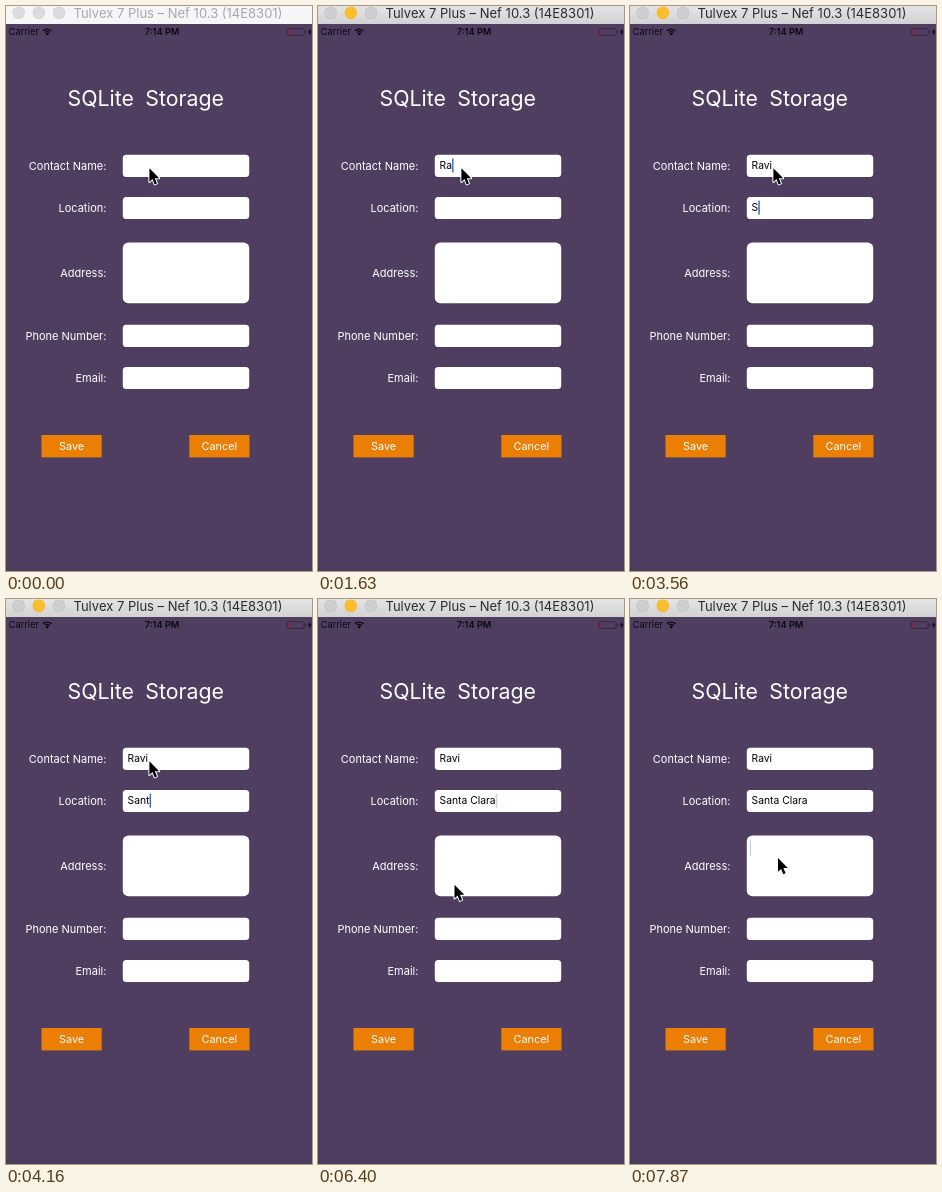
Recreate the animation shown at these times as an HTML page with a canvas. Size 306 by 565 pixels, loop 8000 ms.

```html
<!DOCTYPE html>
<html lang="en">
<head>
<meta charset="utf-8">
<title>SQLite Storage</title>
<style>
html, body { margin: 0; width: 100%; height: 100%; overflow: hidden; background: #503e61; }
canvas { display: block; width: 306px; height: 565px; }
</style>
</head>
<body>
<canvas id="stage"></canvas>
<script>
const W = 306, H = 565, LOOP = 8000, TICK = 148.4;
const canvas = document.getElementById('stage');
const ctx = canvas.getContext('2d');
const dpr = window.devicePixelRatio || 1;
canvas.width = W * dpr;
canvas.height = H * dpr;

const FAMILY = 'Inter, Roboto, sans-serif';
const PERSON = 'Ravi', PLACE = 'Santa Clara';
const PURPLE = '#503e61', ORANGE = '#ea7f03', INK = '#0b0810';

const FIELDS = [
  { label: 'Contact Name:', y: 148.8 },
  { label: 'Location:', y: 190.9 },
  { label: 'Address:', y: 236.6, h: 60.6, radius: 5.5 },
  { label: 'Phone Number:', y: 318.8 },
  { label: 'Email:', y: 360.9 }
].map(f => ({ h: 22.2, radius: 3.5, ...f }));

// Stretches of focus and typing, in ticks; the caret blinks once one is over.
const ACTIVITY = [
  { field: 0, from: 2, to: 13 },
  { field: 1, from: 16, to: 16 },
  { field: 1, from: 24, to: 36 },
  { field: 2, from: 46, to: 46 }
];

const START = { x: 143.4, y: 162.2 }, LOW = { x: 136.5, y: 285.7 }, REST = { x: 148, y: 259 };

const clamp = (v, lo, hi) => Math.min(hi, Math.max(lo, v));
const lerp = (a, b, p) => a + (b - a) * p;

function ease(tick, from, to) {
  const p = clamp((tick - from) / (to - from), 0, 1);
  return p * p * (3 - 2 * p);
}

function typed(str, tick, start, rate) {
  if (tick < start) return '';
  return str.slice(0, Math.floor(1.45 + (tick - start) * rate));
}

// Four ticks on, one faint, two off, one faint.
function blink(idle) {
  const phase = (idle + 8) % 8;
  return phase < 4 ? 1 : phase === 4 || phase === 7 ? 0.3 : 0;
}

function text(str, x, y, size, color, align = 'left', weight = 400) {
  ctx.font = `${weight} ${size}px ${FAMILY}`;
  ctx.textAlign = align;
  ctx.fillStyle = color;
  ctx.fillText(str, x, y);
}

function rect(x, y, w, h, color) {
  ctx.fillStyle = color;
  ctx.fillRect(x, y, w, h);
}

function disc(x, y, r, color) {
  ctx.beginPath();
  ctx.arc(x, y, r, 0, Math.PI * 2);
  ctx.fillStyle = color;
  ctx.fill();
}

function polygon(points) {
  ctx.beginPath();
  points.forEach(([x, y]) => ctx.lineTo(x, y));
  ctx.closePath();
}

function titleBar(active) {
  const shade = ctx.createLinearGradient(0, 0, 0, 18);
  shade.addColorStop(0, active ? '#e4e4e4' : '#f6f6f6');
  shade.addColorStop(1, active ? '#d2d2d2' : '#f6f6f6');
  rect(0, 0, W, 18, shade);
  for (let i = 0; i < 3; i++) {
    const x = 12.6 + 20.2 * i;
    const yellow = active && i === 1;
    disc(x, 6.7, 6.3, yellow ? '#f3b52c' : active ? '#bfbfbf' : '#d2d2d2');
    disc(x, 6.7, 5.7, yellow ? '#fdbe2e' : active ? '#cfcfcf' : '#dcdcdc');
  }
  text('Tulvex 7 Plus – Nef 10.3 (14E8301)', 67.5, 12, 13, active ? '#2c2c2c' : '#a8a8a8');
}

function statusBar() {
  text('Carrier', 2.8, 29, 9.2, INK);
  text('7:14 PM', 156, 29, 9.2, INK, 'center', 600);

  ctx.strokeStyle = INK;
  ctx.lineWidth = 1.3;
  for (const r of [3.4, 5.8]) {
    ctx.beginPath();
    ctx.arc(41.3, 29, r, -Math.PI * 0.76, -Math.PI * 0.24);
    ctx.stroke();
  }
  disc(41.3, 28, 1.3, INK);

  ctx.lineWidth = 0.7;
  ctx.strokeStyle = '#2a1c33';
  ctx.beginPath();
  ctx.roundRect(281, 22.7, 17, 6.6, 1.4);
  ctx.stroke();
  rect(282, 23.7, 1.8, 4.6, '#8a2436');
  rect(298.9, 24.8, 1, 2.4, '#2a1c33');
  polygon([[304.6, 22.3], [301.8, 26.5], [303.6, 26.5], [302.8, 29.8], [305.8, 25.4], [304, 25.4]]);
  ctx.fillStyle = INK;
  ctx.fill();
}

function button(label, x) {
  rect(x, 429, 60.2, 22.4, ORANGE);
  text(label, x + 30.1, 444.4, 10.9, '#fff', 'center');
}

function caret(tick, values) {
  const last = ACTIVITY.filter(a => a.from <= tick).pop() || ACTIVITY[0];
  const idle = tick < last.from ? tick - last.from : Math.max(0, tick - last.to);
  const { y } = FIELDS[last.field];
  const value = values[last.field];
  ctx.globalAlpha = blink(idle);
  if (value === undefined) rect(119.7, y + 5, 1.5, 15, '#4169e0');
  else rect(121.7 + ctx.measureText(value).width, y + 3.7, 1.5, 14, '#4169e0');
  ctx.globalAlpha = 1;
}

function form(tick) {
  text('SQLite', 61.6, 100, 21.3, '#fff');
  text('Storage', 139.3, 100, 21.3, '#fff');

  const values = [typed(PERSON, tick, 10, 1), typed(PLACE, tick, 24, 5 / 6)];
  FIELDS.forEach(({ label, y, h, radius }, i) => {
    const base = Math.round(y + h / 2 + 4.4);
    text(label, 100.4, base, 11, '#fff', 'right');
    ctx.beginPath();
    ctx.roundRect(116.8, y, 126.4, h, radius);
    ctx.fillStyle = '#fff';
    ctx.fill();
    text(values[i] || '', 121.6, base - 0.7, 10.3, '#000');
  });
  caret(tick, values);

  button('Save', 35.5);
  button('Cancel', 183.3);
}

function pointer(tick) {
  const down = ease(tick, 40, 43), back = ease(tick, 45, 48);
  const at = axis => lerp(lerp(START[axis], LOW[axis], down), REST[axis], back);
  ctx.save();
  ctx.translate(at('x'), at('y'));
  polygon([[0, 0], [0, 13.8], [3.1, 10.9], [5.3, 16.2], [7.6, 15.2], [5.4, 10.1], [9.8, 10]]);
  ctx.lineJoin = 'round';
  ctx.lineWidth = 2;
  ctx.strokeStyle = '#fff';
  ctx.stroke();
  ctx.fillStyle = '#000';
  ctx.fill();
  ctx.restore();
}

function draw(now) {
  const tick = Math.floor((now % LOOP + 10) / TICK);
  ctx.setTransform(dpr, 0, 0, dpr, 0, 0);
  rect(0, 0, W, H, PURPLE);
  rect(0, 561, W, 4, '#4c3b5d');
  titleBar(tick >= 4);
  statusBar();
  form(tick % 54);
  pointer(tick);
  requestAnimationFrame(draw);
}
requestAnimationFrame(draw);
</script>
</body>
</html>
```
